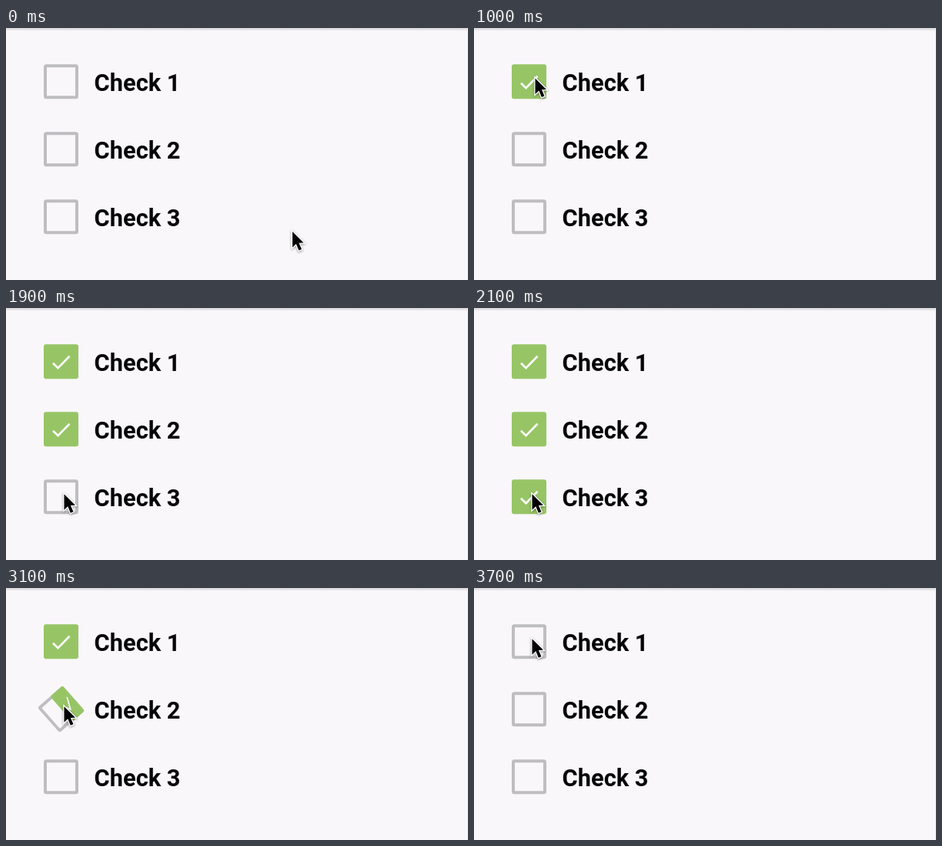
An HTML page that plays this animation: 600x328 px, repeating every 3.8 s.

```html
<!DOCTYPE html>
<html lang="en">
<head>
<meta charset="utf-8">
<title>Checkboxes</title>
<style>
  html, body { margin: 0; width: 100%; height: 100%; overflow: hidden; background: #f9f7fa; }
  svg { display: block; }
  text { font: 700 30.8px Roboto, sans-serif; fill: #060608; }
  .frame { fill: none; stroke: #bebdc0; stroke-width: 4; }
  .fill { fill: #97c566; }
  .tick { fill: none; stroke: #fff; stroke-width: 2.6; }
  #cursor {
    fill: #000; stroke: #fff; stroke-width: 2.6; paint-order: stroke;
    filter: drop-shadow(0 1.5px 1.5px rgba(0, 0, 0, .4));
  }
</style>
</head>
<body>
<svg width="600" height="328" viewBox="0 0 600 328">
  <defs>
    <linearGradient id="shade" x2="0" y2="1">
      <stop stop-color="#d2d1d4"/>
      <stop offset="1" stop-color="#f9f7fa"/>
    </linearGradient>
  </defs>
  <rect width="600" height="4" fill="url(#shade)"/>
  <rect x="599" width="1" height="328" fill="#e8e6ea"/>
  <g id="rows"></g>
  <path id="cursor" d="M0 0V20.5L4.8 16L8.3 24.5L12 23L8.4 14.8L14.5 14.6Z"/>
</svg>
<script>
const LOOP = 3800, STEP = 100, FLIP = 185;

const rowY = i => 69.75 + 88 * i;
const checkTime = i => 800 + 550 * i;
const uncheckTime = i => 3515 - 500 * i;
const tip = i => [75.5, rowY(i) - 3.5];

// Cursor glides: start, duration, destination
const home = [372, 265];
const glides = [
  [0, 600, [95.5, 85]],
  [600, 200, [79.5, 65.5]],
  [1020, 330, tip(1)],
  [1600, 250, tip(2)],
  [2700, 300, tip(1)],
  [3200, 300, tip(0)]
];

const ramp = (t, start, span) => Math.min(1, Math.max(0, (t - start) / span));
const ease = u => u * u * (3 - 2 * u);

const rows = document.getElementById("rows");
const cursor = document.getElementById("cursor");

rows.innerHTML = [0, 1, 2].map(i => `
  <g class="box">
    <rect class="frame" x="-20.5" y="-20.5" width="41" height="41" rx="1.5"/>
    <g class="face">
      <rect class="fill" x="-22.5" y="-22.5" width="45" height="45" rx="3"/>
      <path class="tick" d="M-10.5 2L-4 8.5L11 -7"/>
    </g>
  </g>
  <text x="114.6" y="${rowY(i) + 12.25}">Check ${i + 1}</text>`).join("");

const boxes = [...rows.querySelectorAll(".box")];

function drawBox(box, i, t) {
  const p = ramp(t, checkTime(i), FLIP) - ramp(t, uncheckTime(i), FLIP);
  const [frame, face] = box.children;
  const turn = (p - 1) * 90;
  const size = 1 - 0.035 * Math.sin(Math.PI * p);
  box.setAttribute("transform", `translate(71.5 ${rowY(i)}) rotate(${turn}) scale(${size})`);
  // The green face grows from the right edge
  const width = p ** 1.15;
  face.setAttribute("transform", `translate(${22.5 * (1 - width)}) scale(${width} 1)`);
  face.style.display = p > 0 ? "" : "none";
  frame.style.display = p < 1 ? "" : "none";
}

const cursorAt = t => glides.reduce((pos, [start, span, to]) => {
  const u = ease(ramp(t, start, span));
  return pos.map((v, k) => v + (to[k] - v) * u);
}, home);

function draw(t) {
  boxes.forEach((box, i) => drawBox(box, i, t));
  cursor.setAttribute("transform", `translate(${cursorAt(t)})`);
}

const start = performance.now();
function tick() {
  const t = (performance.now() - start) % LOOP;
  draw(Math.floor(t / STEP) * STEP);
  requestAnimationFrame(tick);
}
tick();
</script>
</body>
</html>
```
